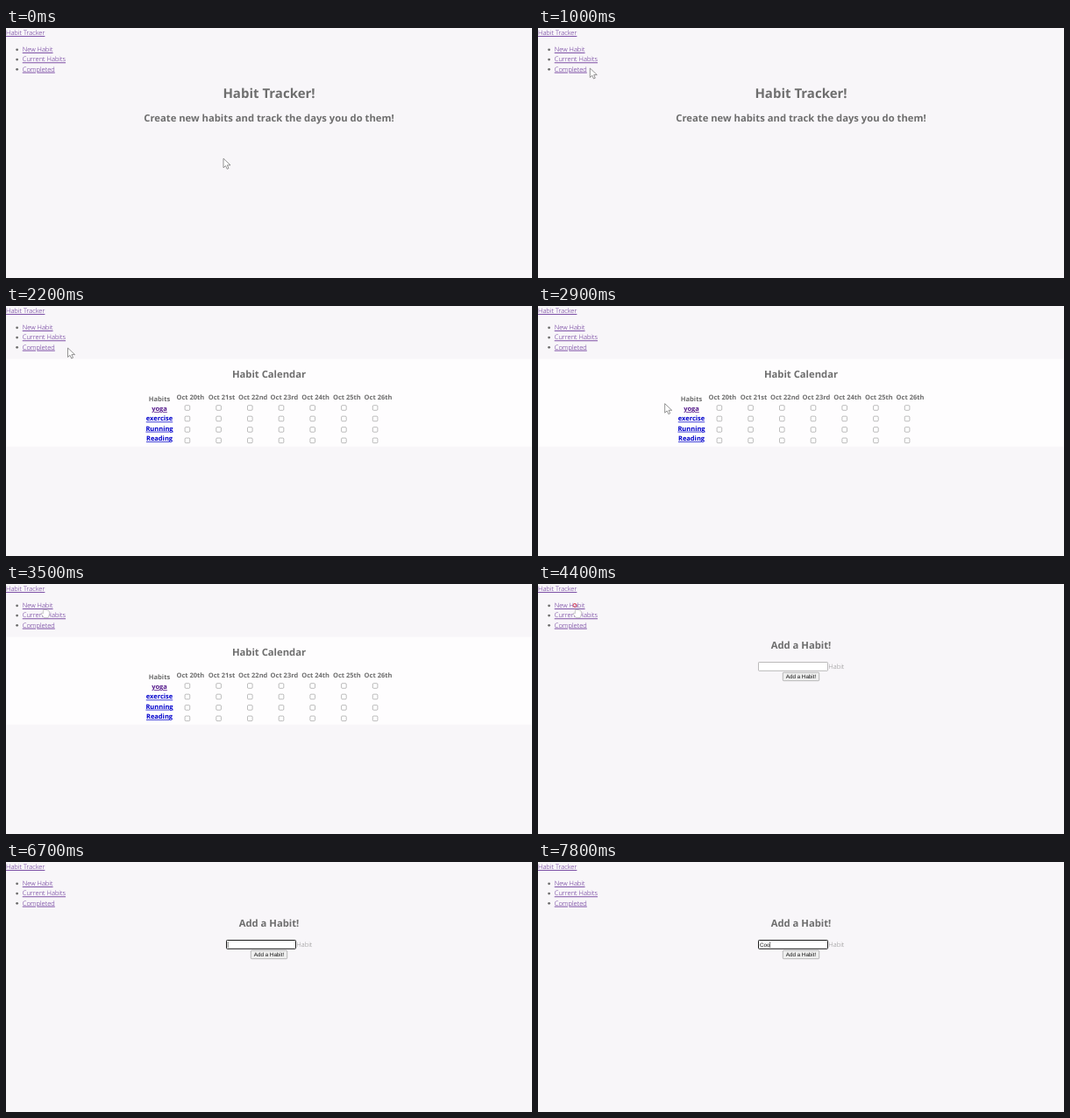
An HTML page for the animation above (8000 ms loop, 600 by 286 pixels).

```html
<!DOCTYPE html>
<html lang="en">
<head>
<meta charset="utf-8">
<title>Habit Tracker</title>
<style>
html, body { margin: 0; width: 100%; height: 100%; overflow: hidden; background: #f8f6f9 }
svg { display: block; width: 600px; height: 286px }
text { font: 300 7.5px "Open Sans", sans-serif; fill: #6e6e6e; white-space: pre; text-rendering: geometricPrecision }
.link { fill: #551a8b; text-decoration: underline }
.bold { font-weight: 700; text-anchor: middle }
.h1 { font-size: 15px }
.h2 { font-size: 11.25px }
.new { fill: #00c }
.ui { font: 6.25px "Liberation Sans", Arial, sans-serif; fill: #111 }
.box { fill: #fff; stroke: #858585; stroke-width: .55 }
.pointer { fill: #fff; stroke: #666; stroke-width: .7; stroke-linejoin: round }
</style>
</head>
<body>
<svg viewBox="0 0 600 286">
  <g id="nav"></g>
  <g id="home">
    <text class="bold h1" x="300" y="79.5">Habit Tracker!</text>
    <text class="bold h2" x="300" y="107.2">Create new habits and track the days you do them!</text>
  </g>
  <g id="calendar">
    <rect x=".5" y="60.5" width="599" height="100.5" fill="#fefdfe" stroke="#faf9fb"/>
    <text class="bold h2" x="300" y="82.1">Habit Calendar</text>
  </g>
  <g id="form">
    <text class="bold h2" x="300" y="74.4">Add a Habit!</text>
    <rect id="input" class="box" x="251.5" y="89.5" width="79" height="9.8" rx=".8"/>
    <text id="typed" class="ui" x="252.9" y="96.6"></text>
    <path id="caret" stroke="#222" stroke-width=".6"/>
    <text x="331.3" y="96.5" style="fill:#888">Habit</text>
    <rect class="box" x="279.3" y="101.2" width="41.4" height="9.5" rx="1" style="fill:#efefef"/>
    <text class="ui" x="300" y="107.7" text-anchor="middle">Add a Habit!</text>
  </g>
  <circle id="ring" fill="none" stroke="#e02b3c"/>
  <g id="cursor">
    <path id="arrow" class="pointer" d="M0 0V10.5L2.5 8.3 4.2 12 6 11.2 4.4 7.6H8Z"/>
    <path id="hand" class="pointer" style="stroke:#999;stroke-width:.5"
      d="M.4 4.8Q1.2 3.6 2 4.8Q3.2 3.6 4 5Q5.2 4.2 5.8 5.6Q7.2 5 7.4 6.8V9.8L6.2 13.4H1.2L-2 9Q-1.6 7.4 .4 8.6Z"/>
    <path id="beam" d="M-1-3.5H1M0-3.5V3.5M-1 3.5H1" fill="none" stroke="#777" stroke-width=".5"/>
  </g>
</svg>
<script>
const el = id => document.getElementById(id);
const show = (id, on) => el(id).style.display = on ? '' : 'none';

function add(parent, tag, attrs, label = '') {
  const node = document.createElementNS('http://www.w3.org/2000/svg', tag);
  for (const key in attrs) node.setAttribute(key, attrs[key]);
  node.textContent = label;
  el(parent).append(node);
}

add('nav', 'text', {class: 'link', x: 0, y: 8}, 'Habit Tracker');
['New Habit', 'Current Habits', 'Completed'].forEach((label, i) => {
  const y = 27.2 + i * 11.25;
  add('nav', 'circle', {cx: 12.6, cy: y - 2.4, r: 1.4, fill: '#6e6e6e'});
  add('nav', 'text', {class: 'link', x: 18.75, y}, label);
});

const days = ['20th', '21st', '22nd', '23rd', '24th', '25th', '26th'];
const habits = ['yoga', 'exercise', 'Running', 'Reading'];
const dayX = i => 210.3 + i * 35.7;
add('calendar', 'text', {class: 'bold', x: 175, y: 108.9}, 'Habits');
days.forEach((day, i) => add('calendar', 'text', {class: 'bold', x: dayX(i), y: 106.5}, 'Oct ' + day));
habits.forEach((habit, row) => {
  add('calendar', 'text', {class: 'bold link' + (row ? ' new' : ''), x: 175, y: 120.2 + row * 11.25}, habit);
  days.forEach((_, i) => add('calendar', 'rect', {
    class: 'box', x: dayX(i) - 6.2, y: 113.7 + row * 12.45, width: 5.6, height: 5.6, rx: 1.1
  }));
});

// Pointer path: time, x, y
const path = [
  [0, 248, 149.3], [100, 248, 149.3], [400, 38, 47], [500, 38, 47], [700, 85, 94], [1000, 59.3, 46],
  [1200, 48, 35], [1900, 48, 35], [2200, 70.5, 48], [2400, 72, 49], [2700, 72, 49], [3000, 181, 143],
  [3200, 110, 80], [3500, 42, 25], [5000, 42, 25], [5200, 290, 94.4], [8000, 290, 94.4]
];
const clicks = [1600, 4200], clickTime = 600;
const typing = [
  [6900, 'C'], [7000, 'Coo'], [7100, 'Cook'], [7200, 'Cookin'],
  [7300, 'Coo'], [7400, 'C'], [7700, 'Co'], [7800, 'Coo']
];

function pointerAt(t) {
  const i = path.findIndex(p => p[0] > t);
  const [t0, x0, y0] = path[i - 1], [t1, x1, y1] = path[i];
  const u = (t - t0) / (t1 - t0);
  return [x0 + (x1 - x0) * u, y0 + (y1 - y0) * u];
}

function draw(t) {
  const [x, y] = pointerAt(t);
  show('home', t < 1800);
  show('calendar', t >= 1800 && t < 4400);
  show('form', t >= 4400);

  const hand = t >= 1200 && t < 2000 || t >= 3400 && t < 5100;
  show('cursor', t < 6700);
  show('hand', hand);
  show('beam', t >= 5200);
  show('arrow', !hand && t < 5200);
  el('cursor').setAttribute('transform', `translate(${x} ${y})`);

  const click = clicks.find(c => t >= c && t < c + clickTime);
  show('ring', click);
  if (click) {
    const u = (t - click) / clickTime, ring = el('ring');
    ring.setAttribute('cx', x);
    ring.setAttribute('cy', y - .6);
    ring.setAttribute('r', 1 + 3 * u);
    ring.setAttribute('opacity', 1 - u * .6);
  }

  const focus = t >= 6700, input = el('input');
  input.style.stroke = focus ? '#1b1b1b' : '';
  input.style.strokeWidth = focus ? 1 : '';
  const typed = el('typed');
  typed.textContent = typing.reduce((now, [at, value]) => t >= at ? value : now, '');
  show('caret', focus);
  const width = typed.textContent ? typed.getComputedTextLength() : 0;
  el('caret').setAttribute('d', `M${253.2 + width} 91v6.9`);
}

const start = performance.now();
function tick() {
  const t = (performance.now() - start) % 8000;
  draw(Math.floor(t / 100) * 100);
  requestAnimationFrame(tick);
}
tick();
</script>
</body>
</html>
```
